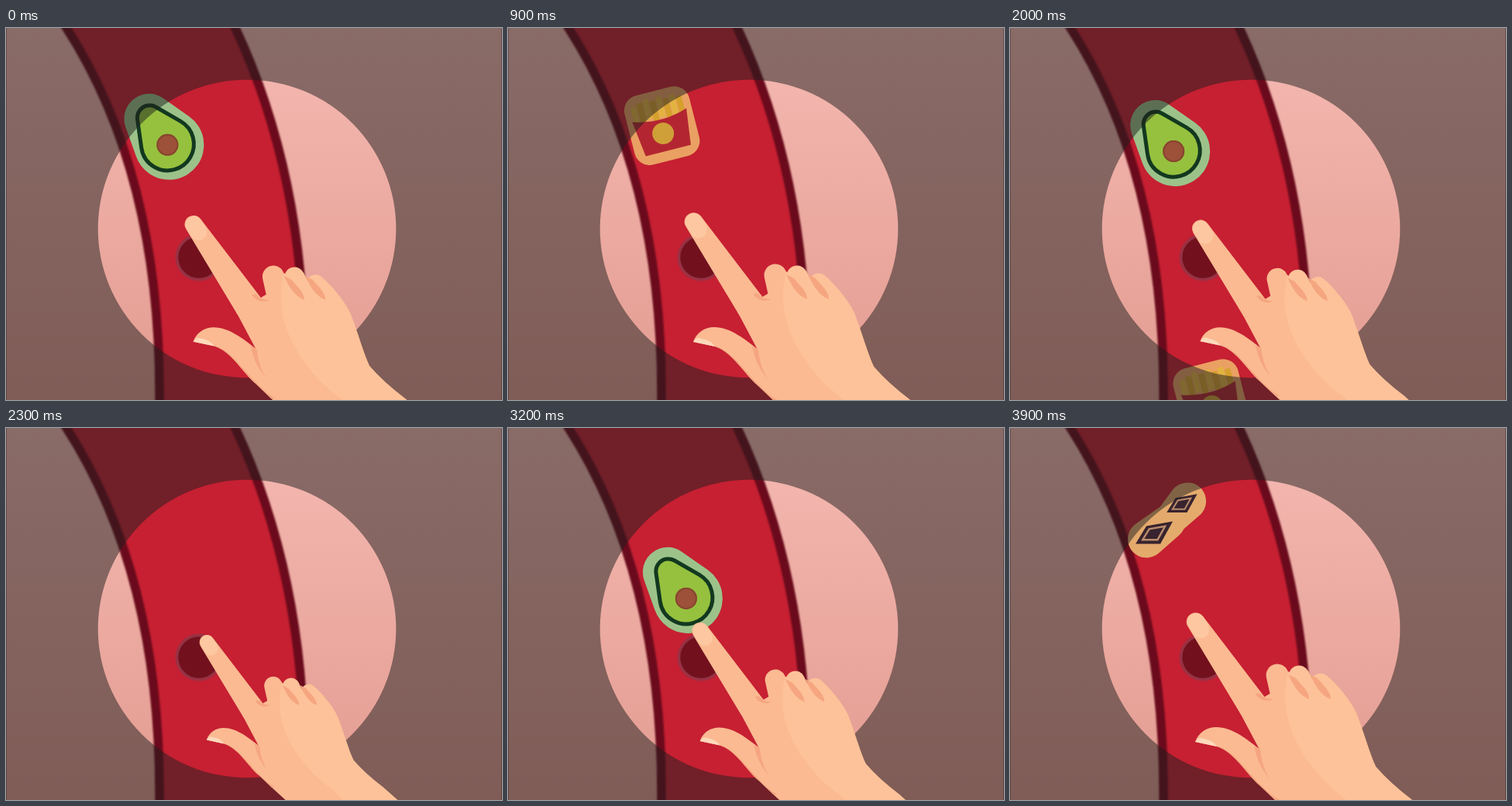
An HTML page with a canvas that plays this animation: 640x480 px, repeating every 4000 ms.

```html
<!DOCTYPE html>
<html lang="en">
<head>
<meta charset="utf-8">
<title>Tap the food</title>
<style>
  html, body { margin: 0; width: 100%; height: 100%; overflow: hidden; background: #8a6a66; }
  canvas { display: block; }
</style>
</head>
<body>
<canvas id="stage" width="640" height="480"></canvas>
<script>
const ctx = document.getElementById('stage').getContext('2d');
const LOOP = 4000, STEP = 100, TURN = Math.PI * 2;
const PRESS_TIME = 900, PRESS_DEPTH = 0.188;
const SKIN = '#fbba92', SKIN_LIGHT = '#fdc299', SKIN_DARK = '#f5a680';

function fill(path, color, rule = 'nonzero') {
  ctx.fillStyle = color;
  ctx.fill(path, rule);
}

function stroke(path, color, width) {
  ctx.strokeStyle = color;
  ctx.lineWidth = width;
  ctx.stroke(path);
}

function disc(x, y, r) {
  const p = new Path2D();
  p.arc(x, y, r, 0, TURN);
  return p;
}

// Outline of two discs joined by their outer tangents.
function hull([ax, ay, ar], [bx, by, br]) {
  const p = new Path2D();
  const axis = Math.atan2(by - ay, bx - ax);
  const spread = Math.acos((ar - br) / Math.hypot(bx - ax, by - ay));
  p.arc(ax, ay, ar, axis + spread, axis - spread + TURN);
  p.arc(bx, by, br, axis - spread, axis + spread);
  p.closePath();
  return p;
}

function placed(x, y, draw) {
  ctx.save();
  ctx.translate(x, y);
  draw();
  ctx.restore();
}

function avocado() {
  const flesh = hull([-18, -24, 16], [5, 10, 34]);
  fill(hull([-19, -23, 32], [7, 11, 45]), '#9cc28a');
  fill(flesh, '#96c13e');
  stroke(flesh, '#12391f', 5);
  fill(disc(5, 11, 14), '#9c5138');
  stroke(disc(5, 11, 13), '#87452f', 2);
}

function fries() {
  const bag = new Path2D(), box = new Path2D('M-36 -14Q0 -2 36 -14L30 33H-30Z');
  bag.roundRect(-43, -46, 86, 92, 20);
  ctx.rotate(-0.25);
  fill(bag, '#eaa063');
  for (let i = 0; i < 8; i++) {
    ctx.fillStyle = i % 2 ? '#d6a02c' : '#e3b340';
    ctx.fillRect(-34 + i * 8.6, -32 - (i * 3) % 7, 7.5, 26);
  }
  fill(box, '#b32631');
  fill(disc(-1, 10, 14), '#cf9f38');
}

function peanut() {
  const gem = new Path2D('M-23 13L-9 -10L25 -16L9 13Z');
  fill(hull([-20, 25, 24], [8, 3, 22]), '#e4aa6c');
  fill(hull([8, 3, 20], [33, -24, 24]), '#e4aa6c');
  for (const [x, y, size] of [[-11, 18, 1], [25, -20, 0.82]]) {
    placed(x, y, () => {
      ctx.scale(size, size);
      fill(gem, '#38232e');
      ctx.scale(0.6, 0.6);
      stroke(gem, '#b98d6c', 4);
    });
  }
}

// start: the item's centre crosses the top edge; end: it is tapped away.
const items = [
  { draw: avocado, start: -437, speed: 0.32, end: 350 },
  { draw: fries, start: 506, speed: 0.32, end: LOOP },
  { draw: avocado, start: 1540, speed: 0.322, end: 2280 },
  { draw: avocado, start: 2499, speed: 0.298, end: 3450 },
  { draw: peanut, start: 3530, speed: 0.32, end: LOOP }
];

function drawItems(t) {
  ctx.filter = 'blur(0.7px)';
  for (const { draw, start, speed, end } of items) {
    const y = (t - start) * speed;
    if (Math.abs(y - 240) < 310 && t < end) placed(152 + 108 * Math.sin(y / 282), y, draw);
  }
  ctx.filter = 'none';
}

function drawVessel() {
  fill(new Path2D('M78 0Q200 190 198 480H384Q394 210 296 0Z'), '#c62032');
  ctx.filter = 'blur(0.8px)';
  for (const wall of ['M75 -5L78 0Q200 190 198 480V490', 'M293 -6L296 0Q394 210 384 480V490']) {
    stroke(new Path2D(wall), '#6a0a1c', 11.5);
  }
  ctx.filter = 'none';
}

function drawShade() {
  const shade = disc(311, 259, 192.3);
  shade.rect(0, 0, 640, 480);
  fill(shade, 'rgba(30,30,30,.5)', 'evenodd');
  ctx.fillStyle = 'rgba(0,0,0,.25)';
  ctx.fillRect(0, 0, 1, 480);
  ctx.fillRect(639, 0, 1, 480);
}

function drawScene(t) {
  const backdrop = ctx.createLinearGradient(0, 0, 0, 480);
  backdrop.addColorStop(0, '#f5b9b2');
  backdrop.addColorStop(1, '#e39c91');
  ctx.fillStyle = backdrop;
  ctx.fillRect(0, 0, 640, 480);

  drawVessel();
  drawItems(t);
  fill(disc(249, 296, 27), 'rgba(20,0,5,.47)');
  stroke(disc(249, 296, 28.5), 'rgba(115,65,85,.5)', 4);
  drawShade();
}

const palm = new Path2D(
  'M296 366L322 415L342 480L430 560H610L519 480Q490 458 472 437' +
  'C464 420 457 394 447 368Q437 347 412 322L340 340Z');
const backOfHand = new Path2D(
  'M359 314C351 345 355 375 369 404C382 431 408 462 434 480L520 560H610L519 480' +
  'Q490 458 472 437C464 420 457 394 447 368Q437 347 412 322L386 340Z');
const thumb = new Path2D(
  'M239 405C243 393 254 386 266 386C287 386 306 402 323 415L360 480H342L322 461' +
  'C305 447 290 418 267 411Z');
const thumbShade = new Path2D('M267 411C292 414 318 465 348 480H342L322 461C305 447 290 418 267 411Z');
const thumbNail = new Path2D('M239 405Q243 398 250 401Q262 403 267 411Z');
const thumbCrease = new Path2D('M323 415Q326 442 337 454Q320 438 315 410Z');
const webCrease = new Path2D('M316 343Q326 356 340 350Q328 350 322 342Z');
const knuckleCrease = new Path2D('M0 0C6 12 12 26 27 32C27 21 16 13 10 5Z');

function drawHand(t) {
  const scale = 1 - PRESS_DEPTH * pressAmount(t);
  ctx.save();
  ctx.translate(345, 392);
  ctx.scale(scale, scale);
  ctx.translate(-345, -392);

  fill(palm, SKIN);
  fill(thumb, SKIN);
  fill(hull([239.5, 250, 11.8], [313, 358, 19]), SKIN);
  fill(hull([345, 319, 14.5], [356, 352, 18]), SKIN);
  fill(backOfHand, SKIN_LIGHT);
  fill(hull([373, 320, 13.5], [385, 352, 16]), SKIN_LIGHT);
  fill(hull([401, 329, 12.5], [412, 352, 15]), SKIN_LIGHT);

  for (const x of [359, 387]) placed(x, 318, () => fill(knuckleCrease, SKIN_DARK));
  for (const shape of [webCrease, thumbCrease, thumbShade]) fill(shape, SKIN_DARK);
  fill(hull([240, 250, 11], [246, 260, 11]), '#fdc8a1');
  fill(thumbNail, '#fdd9bb');
  ctx.restore();
}

function pressAmount(t) {
  const since = [-105, 1826, 2994, 3895].map(start => t - start)
    .find(age => age >= 0 && age < PRESS_TIME) || 0;
  return Math.sin(Math.PI * since / PRESS_TIME) ** 2;
}

const began = performance.now();
function render() {
  const elapsed = (performance.now() - began) % LOOP;
  const t = Math.floor(elapsed / STEP) * STEP;
  drawScene(t);
  drawHand(t);
  requestAnimationFrame(render);
}
render();
</script>
</body>
</html>
```
